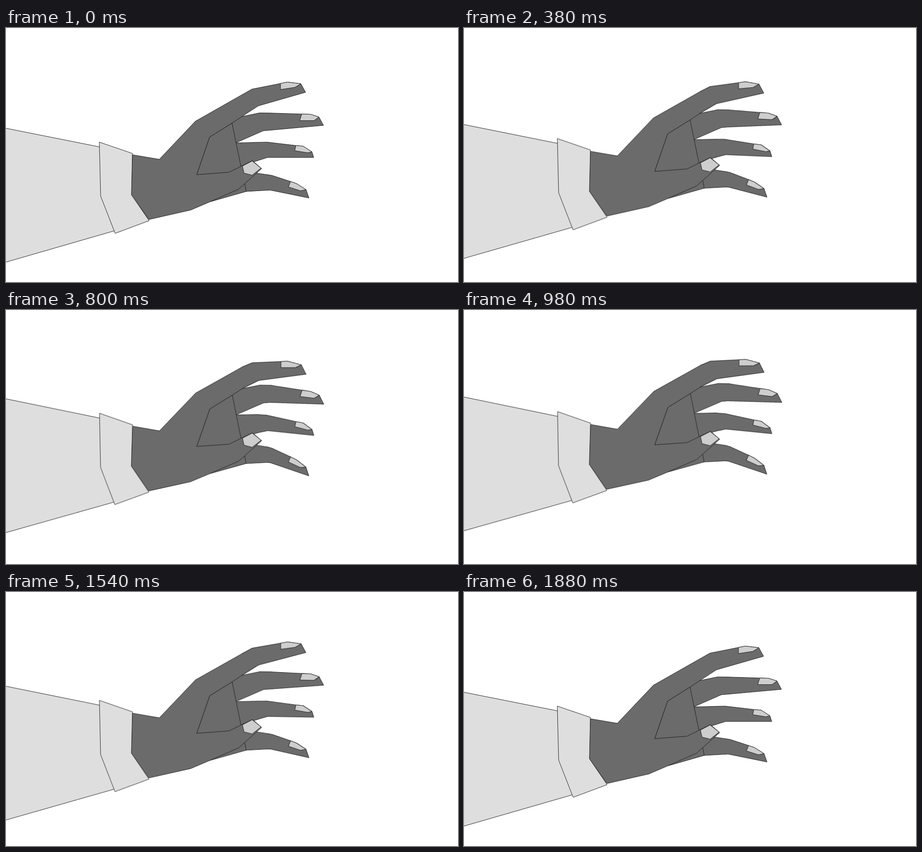
An HTML page without scripts for the animation above (1900 ms loop, 998 by 561 pixels).

```html
<!DOCTYPE html>
<html lang="en">
<head>
<meta charset="utf-8">
<title>Waving hand</title>
<style>
html, body { margin: 0; width: 100%; height: 100%; overflow: hidden; background: #fff; }
svg { display: block; width: 100%; height: 100%; }
path { stroke: #1c1c1c; stroke-width: 1; stroke-linejoin: round; }
.cloth { fill: #dedede; }
.skin { fill: #6b6b6b; }
.nail { fill: #cecece; }

/* The whole arm lifts and tilts. */
.arm {
  transform-origin: 0 330px;
  animation: lift 1900ms cubic-bezier(.37, 0, .63, 1) infinite;
}
@keyframes lift {
  56.8% {
    transform: translateY(-29.7px) rotate(.41deg);
    animation-timing-function: cubic-bezier(.42, 0, .66, 1);
  }
}

/* Each fingertip sags from a vertical cut at its knuckle, so the seam stays closed. */
.tip {
  transform-origin: var(--knuckle) 0;
  animation: sag 1900ms cubic-bezier(.37, 0, .63, 1) infinite;
}
@keyframes sag {
  45.3% {
    transform: skewY(var(--sag));
    animation-timing-function: cubic-bezier(.3, 0, .4, 1);
  }
}
.little { --knuckle: 578px; --sag: 7.6deg; }
.ring { --knuckle: 555px; --sag: 5.6deg; }
.middle { --knuckle: 583px; --sag: 6.8deg; }
.index { --knuckle: 521px; --sag: 8.6deg; }
</style>
</head>
<body>
<svg viewBox="0 0 998 561">
  <g class="arm">
    <path class="cloth" d="M-20 217.5 206 262.5 260 300V442L-20 522.8Z"/>

    <path class="skin" d="M579 324.3 553 320.5 515 315V361H530.5L579 358.2"/>
    <g class="tip little">
      <path class="skin" d="M578 324.2 587 325.5 628.5 339 642 344 662.5 357 669 375.5 583 358 578 358.3"/>
      <path class="nail" d="M628.5 339 642 344 662.5 357 650 359.5 623.5 351Z"/>
    </g>

    <path class="skin" d="M556 252.5 500 254 510 308 549 295 556 292.8"/>
    <g class="tip ring">
      <path class="skin" d="M555 252.5 576 252 640 259.5 656 261 675.5 273.5 679.5 286H577.5L555 293.1"/>
      <path class="nail" d="M640 259.5 656 261 675.5 273.5 666 275.5 637.5 271Z"/>
    </g>

    <path class="skin" d="M584 187.8 560 187.5 521 195.5 490 202V260L509 253 568 227 584 225.6"/>
    <g class="tip middle">
      <path class="skin" d="M583 187.8 653 190 672 190.5 691 196.5 701 215 583 225.7"/>
      <path class="nail" d="M653 190 672 190.5 691 196.5 680 204.5H648.5Z"/>
    </g>

    <!-- palm, then the back of the hand with the thumb -->
    <path class="skin" d="M499 210 518.5 304.5 527 344 530.5 361 450 384 421 324 449.5 241Z"/>
    <path class="skin" d="M522 194.9 499 210 449.5 241 421 324 492.5 318.5 544 293 564.5 310.5 513.5 356 450 384 408 402 315.5 423 277 368.5 279 280 338.5 290 418 206 522 146.9"/>
    <path class="nail" d="M522 305 543.5 293.8 563 309.5 543.5 325 525.5 320.5Z"/>
    <g class="tip index">
      <path class="skin" d="M521 147.5 543 135 606 122.5 621 119.5 651 123 661.5 142 557 172 521 195.5"/>
      <path class="nail" d="M606 122.5 621 119.5 651 123 638 131 606 136Z"/>
    </g>

    <path class="cloth" d="M206 252 279 277 277 368.5 316 425.5 241 453.5 209 371.5Z"/>
  </g>
</svg>
</body>
</html>
```
